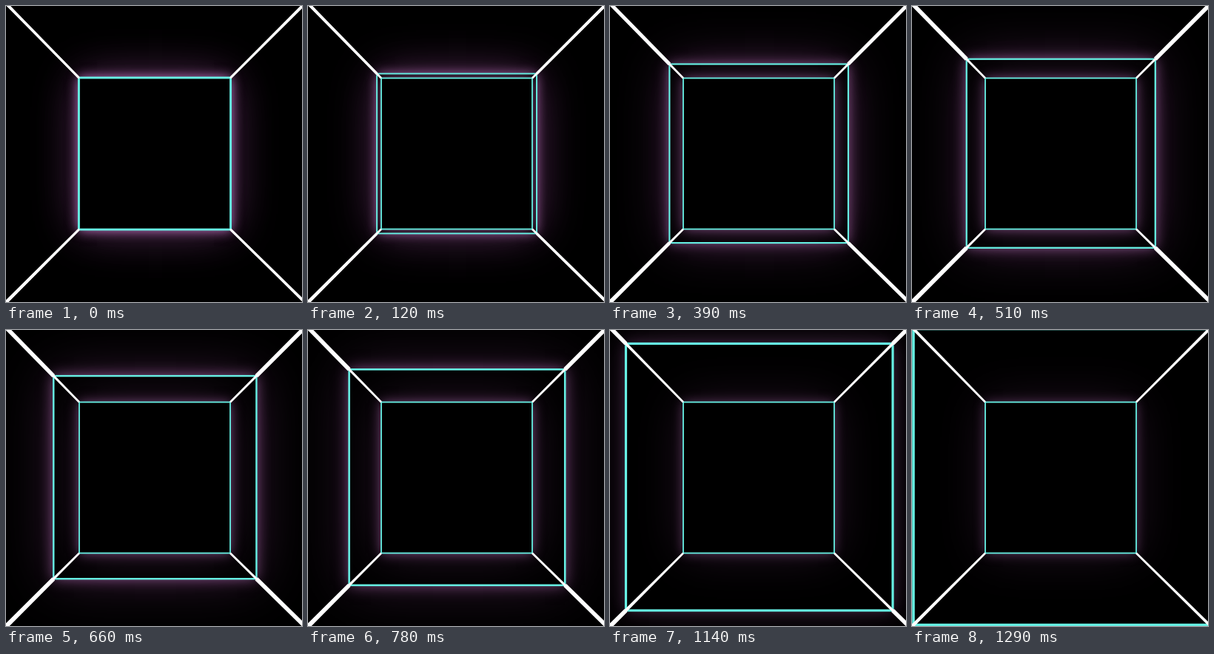
Animation of 400 by 400 pixels, one loop 1350 ms. Source, as an HTML page:

```html
<!DOCTYPE html>
<html lang="en">
<head>
<meta charset="utf-8">
<title>Neon tunnel</title>
<style>
  html, body { margin: 0; width: 100%; height: 100%; overflow: hidden; background: #000; }
  #stage { position: relative; width: 400px; height: 400px; overflow: hidden; background: #000; }
  .glow { position: absolute; }
  svg { position: absolute; left: 0; top: 0; }
  rect { fill: none; stroke: #66f0e4; }
  path { fill: #fff; }
</style>
</head>
<body>
<div id="stage">
  <div class="glow" id="backGlow"></div>
  <div class="glow" id="ringGlow"></div>
  <svg width="400" height="400" viewBox="0 0 400 400">
    <rect id="back"/>
    <rect id="ring"/>
    <path id="backEdges"/>
    <path id="ringEdges"/>
  </svg>
</div>
<script>
const LOOP = 1350, STEP = 30, LAST = 1290;
const BACK = 102, FAR = 225;
const $ = id => document.getElementById(id);
const clamp = (v, a, b) => Math.max(a, Math.min(b, v));

// The vanishing point sits slightly off the stage centre.
const centre = h => {
  const drift = (h - BACK) * 0.01;
  return [201 + drift, 199.5 - drift];
};

// Half size of the ring as it approaches at constant speed.
const ringSize = t => 1 / (0.0097 - 0.0047 * t / LAST);

function drawSquare(id, h) {
  const [cx, cy] = centre(h), el = $(id);
  const attrs = { x: cx - h, y: cy - h, width: 2 * h, height: 2 * h,
                  'stroke-width': 1.8 * h / BACK };
  for (const k in attrs) el.setAttribute(k, attrs[k]);
}

function drawGlow(id, h, power) {
  const [cx, cy] = centre(h), s = $(id).style;
  const scale = Math.sqrt(h / BACK);
  s.left = cx - h + 'px';
  s.top = cy - h + 'px';
  s.width = s.height = 2 * h + 'px';
  s.boxShadow =
    `0 0 ${15 * scale}px rgba(190,115,190,${0.68 * power}),` +
    `0 0 ${62 * scale}px rgba(130,68,130,${0.38 * power})`;
}

// Tapered beams running from the corners of a square off the stage.
function drawEdges(id, h, near, far) {
  const [ax, ay] = centre(h), [bx, by] = centre(FAR);
  let d = '';
  for (const sx of [-1, 1]) for (const sy of [-1, 1]) {
    const extra = sx < 0 && sy > 0 ? 0.7 : 0;
    const point = (cx, cy, r, w) => {
      const o = w / 2 * Math.SQRT1_2;
      return `${cx + sx * r + sy * o} ${cy + sy * r - sx * o}`;
    };
    d += `M${point(ax, ay, h, near)}L${point(bx, by, FAR, far + extra)}` +
         `L${point(bx, by, FAR, -far - extra)}L${point(ax, ay, h, -near)}Z`;
  }
  $(id).setAttribute('d', d);
}

function draw(ms) {
  const t = Math.min(LAST, Math.floor(ms % LOOP / STEP) * STEP);
  const h = ringSize(t);
  const w = clamp(3 + (h - 103) * 0.1, 3, 5.4);
  drawSquare('ring', h);
  drawGlow('ringGlow', h, 1 - 0.5 * clamp((t - 700) / 440, 0, 1));
  drawGlow('backGlow', BACK, 0.9 - 0.25 * clamp((t - 800) / 400, 0, 1));
  drawEdges('ringEdges', h, w, w + 0.3);
}

drawSquare('back', BACK);
drawEdges('backEdges', BACK, 2.6, 4.2);

const start = performance.now();
function tick() {
  draw(performance.now() - start);
  requestAnimationFrame(tick);
}
tick();
</script>
</body>
</html>
```
